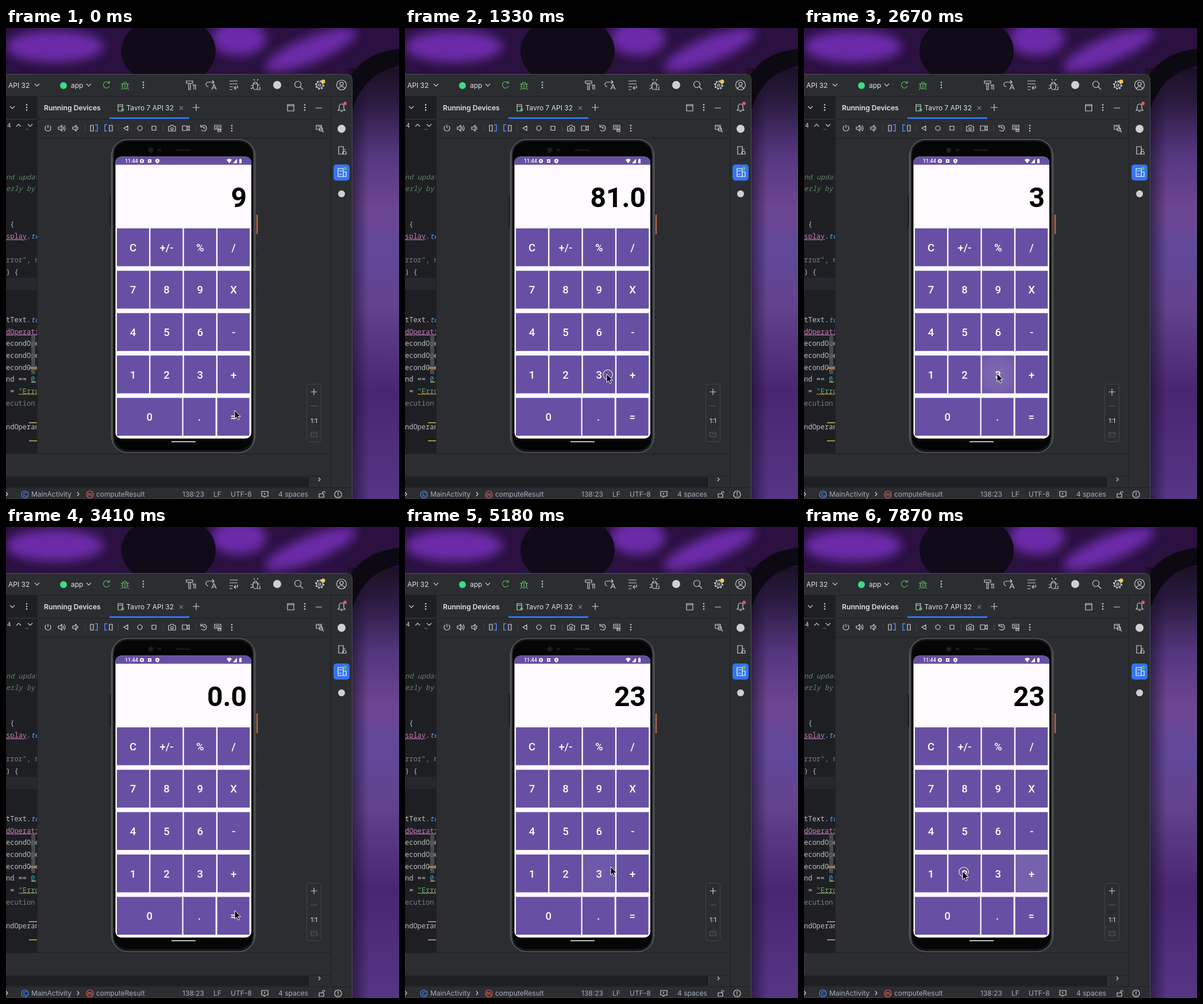
An HTML page that plays this animation: 684x818 px, repeating every 8 s.

```html
<!DOCTYPE html>
<html lang="en">
<head>
<meta charset="utf-8">
<title>Calculator in an emulator</title>
<style>
  html, body { margin: 0; width: 100%; height: 100%; overflow: hidden; background: #1c0f2b; }
  svg { display: block; }
  text { white-space: pre; }
  .ui { font: 12px Inter, sans-serif; fill: #dfe1e5; }
  .code { font: 12px "Noto Sans Mono", monospace; fill: #bcbec4; }
  .app { font: 500 18.5px Roboto, sans-serif; fill: #fff; text-anchor: middle; }
  .icons { fill: none; stroke: #ced0d6; stroke-width: 1.2; }
  .dots { fill: #ced0d6; stroke: none; }
  .pink { fill: #c77dbb; text-decoration: underline; }
  .blue { fill: #56a8f5; font-style: italic; }
  .doc { fill: #5f826b; font-style: italic; }
  .dim { fill: #7a7e85; }
</style>
</head>
<body>
<svg width="684" height="818" viewBox="0 0 684 818">
  <defs>
    <linearGradient id="side" x1="0" y1="0" x2="0" y2="1">
      <stop offset="0" stop-color="#1b1026"/><stop offset=".08" stop-color="#2c1b42"/>
      <stop offset=".2" stop-color="#54377e"/><stop offset=".32" stop-color="#6d4591"/>
      <stop offset=".43" stop-color="#60489a"/><stop offset=".55" stop-color="#63438d"/>
      <stop offset=".75" stop-color="#492672"/><stop offset="1" stop-color="#553584"/>
    </linearGradient>
    <linearGradient id="shade">
      <stop offset="0" stop-color="#140b20" stop-opacity=".55"/>
      <stop offset="1" stop-color="#140b20" stop-opacity="0"/>
    </linearGradient>
    <linearGradient id="bezel">
      <stop offset="0" stop-color="#55565a"/><stop offset=".025" stop-color="#161719"/>
      <stop offset=".975" stop-color="#161719"/><stop offset="1" stop-color="#4c4d51"/>
    </linearGradient>
    <radialGradient id="wave" gradientUnits="userSpaceOnUse">
      <stop offset="0" stop-color="#fff"/><stop offset=".6" stop-color="#fff" stop-opacity=".75"/>
      <stop offset="1" stop-color="#fff" stop-opacity=".3"/>
    </radialGradient>
    <filter id="soft" x="-50%" y="-50%" width="200%" height="200%"><feGaussianBlur stdDeviation="9"/></filter>
    <clipPath id="editor"><rect y="158" width="54" height="581"/></clipPath>
  </defs>

  <!-- Wallpaper -->
  <rect width="684" height="100" fill="#2a1140"/>
  <g filter="url(#soft)" fill="#6c2ba8">
    <ellipse cx="85" cy="32" rx="85" ry="28"/>
    <ellipse cx="405" cy="18" rx="48" ry="30"/>
    <ellipse cx="530" cy="38" rx="85" ry="22" transform="rotate(-22 530 38)"/>
  </g>
  <rect x="594" y="70" width="90" height="748" fill="url(#side)"/>
  <rect x="603" y="70" width="28" height="748" fill="url(#shade)"/>
  <path d="M600 84C618 52 650 40 684 36V66C650 74 618 90 600 150Z" fill="#0d0912"/>
  <ellipse cx="283" cy="40" rx="82" ry="62" fill="#110a18"/>

  <!-- Window panels -->
  <path d="M0 80.5H592Q602.5 80.5 602.5 91V818H0Z" fill="#2b2d30" stroke="#4b4d52"/>
  <path d="M0 118H54V739H0ZM0 780H528V797H0Z" fill="#1e1f22"/>
  <path d="M0 118.5H602M54 158.5H565M54 191.5H565M0 739.5H565M0 778.5H565M0 798.5H602M54.5 118V739M565.5 118V798" stroke="#1e1f22" fill="none"/>
  <path d="M0 158.5H54M528.5 779V798" stroke="#393b40"/>
  <path d="M180 156.500H319" stroke="#3574f0" stroke-width="3"/>

  <!-- Editor -->
  <g clip-path="url(#editor)">
    <rect y="434" width="54" height="21" fill="#26282e"/>
    <g class="code" id="code"></g>
    <rect x="44" y="533" width="7" height="68" fill="#55575b" opacity=".75"/>
    <path d="M40 590.500H54M40 685.500H54M40 717H54M44 615H52" stroke="#d6ae58" stroke-width="1.500"/>
    <path d="M22 637l2-2 2 2 2-2 2 2 2-2 2 2 2-2 2 2 2-2 2 2 2-2 2 2 2-2 2 2 2-2 2 2" fill="none" stroke="#d6ae58"/>
  </g>

  <!-- Labels -->
  <g class="ui">
    <text x="4" y="103.500">API 32</text>
    <text x="113" y="103.500">app</text>
    <text x="66" y="143" style="font-size:12.200px;font-weight:600">Running Devices</text>
    <text x="209.500" y="143">Tavro 7 API 32</text>
    <text x="2" y="173" style="font-size:10px">4</text>
    <text x="536" y="686" text-anchor="middle" style="font-size:11px">1:1</text>
    <g fill="#a8adbd">
      <text x="44" y="814">MainActivity</text><text x="157" y="814">computeResult</text>
      <text x="307" y="814">138:23</text><text x="361" y="814">LF</text>
      <text x="391" y="814">UTF-8</text><text x="474" y="814">4 spaces</text>
    </g>
  </g>

  <!-- Top toolbar -->
  <g class="icons">
    <path d="M50 97l4 4 4-4M140 97l4 4 4-4M7 136l4 4 4-4M18 171l4-4 4 4M38 167l4 4 4-4"/>
    <path d="M314 92h11v4h-11zM318 96v11h3v-11M324 99h6v8M327 99v8"/>
    <path d="M352 102a4 4 0 0 1 0-8h10m-3-3 3 3-3 3M358 107l4-9 4 9m-6.500-3h5"/>
    <path d="M389 92h14M389 97h14M389 102h6M389 107h5M403 100v4h-6m3-3-3 3 3 3"/>
    <path d="M430 97h8v6a4 4 0 0 1-8 0zM431 97a3 3 0 0 1 6 0M430 100h-4m4 3-4 3M438 99h4m-9-8 -2-2m6 2 2-2M437 107h5v-5"/>
    <circle cx="508" cy="98" r="5.500"/><path d="M512 102l5 5"/>
    <circle cx="546" cy="99" r="5.500"/><circle cx="546" cy="99" r="2"/>
    <circle cx="546" cy="99" r="7" stroke-dasharray="2.800 2.700" stroke-width="2"/>
    <circle cx="584" cy="99" r="8.500"/><circle cx="584" cy="97" r="3"/><path d="M578 105q6-7 12 0"/>
    <g stroke="#5fb865">
      <path d="M179 95a5.500 5.500 0 1 0 1 6M180 92v4h-4"/>
      <path d="M203 97h8v5a4 4 0 0 1-8 0zM204 97a3 3 0 0 1 6 0M203 99l-3-2m3 5h-3m3 3-3 2M211 99l3-2m-3 5h3m-3 3 3 2M207 98v7"/>
    </g>
  </g>
  <circle cx="100" cy="100" r="6" fill="#3ddc84"/>
  <circle cx="472" cy="99" r="7" fill="#ced0d6"/>
  <circle cx="584" cy="175" r="7" fill="#ced0d6"/>
  <circle cx="584" cy="288" r="6" fill="#ced0d6"/>
  <circle cx="552" cy="93" r="3.500" fill="#f2c55c"/>

  <!-- Tool window header and device controls -->
  <g class="icons">
    <path d="M302 136l6 6m0-6-6 6" stroke="#7a7e85"/>
    <path d="M195 133h8v11h-8zM196 136h6M201 143h4M325 138h12M331 132v12M539 139h11"/>
    <path d="M490 133h11v11h-11zM490 135h11"/>
    <path d="M70 170a5 5 0 1 0 6 0M73 168v6M91 172h3l3-3v10l-3-3h-3zM99 171q2 3 0 6M101 169q4 5 0 10M116 172h3l3-3v10l-3-3h-3zM124 171q2 3 0 6"/>
    <path d="M147 169h5v10h-5zM180 169h5v10h-5z"/>
    <path d="M155 168h4v11h-4M176 168h-4v11h4" stroke="#548af7" stroke-width="1.500"/>
    <path d="M212 170v8l-7-4zM254 170.500h7v7h-7zM283 171h3l1-2h4l1 2h3v8h-12zM307 170h8v8h-8zM315 173l4-3v8l-4-3M340 171a5 5 0 1 1 0 6M339 168v4h4M344 171v3h3"/>
    <circle cx="233" cy="174" r="4"/><circle cx="289" cy="175" r="2"/>
    <path d="M363 169h11v7h-11zM365 171.500h7M365 174h7M369 177h5v3h-5zM540 169h9v7h-9zM542 171h6"/>
    <circle cx="548" cy="176" r="3"/><path d="M550 178l3 3"/>
    <path d="M578 143h12l-2-3v-4a4 4 0 0 0-8 0v4zM582 145h4"/>
    <path d="M579 206h8v13h-8zM587 211h4M586 219v-2a3 3 0 0 1 6 0v2z"/>
  </g>
  <path d="M137.500 168V180M195.500 168V180M273.500 168V180M330.500 168V180" stroke="#43454a"/>
  <circle cx="590" cy="131" r="3" fill="#e55765"/>
  <rect x="570" y="237" width="28" height="28" rx="5" fill="#3574f0"/>
  <path d="M578 244h9v14h-9zM580 248h5M587 250h5v8h-7M580 254h4" class="icons" style="stroke:#fff"/>
  <circle cx="590" cy="244" r="3" fill="#5fb865"/><circle cx="203" cy="142" r="2.500" fill="#5fb865"/>
  <g class="dots" id="dots"></g>

  <!-- Zoom box and status bar -->
  <rect x="523.500" y="618.500" width="25" height="100" rx="4" fill="none" stroke="#43454a"/>
  <g class="icons">
    <path d="M530.500 632h11M536 626.500v11"/>
    <path d="M530 656.500h12M531 702h10v8h-10zM534 706l4-2" stroke="#55585e"/>
    <path d="M544 781l3 3-3 3M0 806l3 3.500-3 3.500M124 806l3 3.500-3 3.500M445 805h11v8h-4l-2 2-2-2h-3zM450 807v4M545 809h8v6h-8zM551 809v-2a2 2 0 0 1 4 0"/>
    <circle cx="578" cy="810" r="6"/><path d="M578 806v5m0 1v2"/>
    <circle cx="33" cy="810" r="6" stroke="#548af7"/><path d="M36 808a3 3 0 1 0 0 4" stroke="#548af7"/>
    <circle cx="146" cy="810" r="6" stroke="#db5c5c"/><path d="M143 813v-5m0 1q3-2 3 1v3m0-3q3-3 3 0v3" stroke="#db5c5c"/>
  </g>

  <!-- Phone -->
  <path d="M182 290V347" stroke="#18191b" stroke-width="3"/>
  <path d="M437 324V358" stroke="#b4664f" stroke-width="2.500"/>
  <path d="M436 394h2M436 459h2" stroke="#111"/>
  <rect x="183.500" y="193.500" width="250" height="544" rx="29" fill="url(#bezel)" stroke="#5b5c60" stroke-width="1.500"/>
  <rect x="187" y="197" width="243" height="536" rx="26" fill="#050506"/>
  <circle cx="252" cy="212" r="5" fill="#17181b"/><circle cx="252" cy="212" r="2" fill="#25272d"/>
  <path d="M296 212H322" stroke="#28292c" stroke-width="3" stroke-dasharray="1 1"/>
  <path d="M264 212h6" stroke="#17181b" stroke-width="4"/>
  <path d="M288 718.500H330" stroke="#fff" stroke-width="1.500"/>
  <rect x="190.500" y="223.500" width="236.500" height="489.500" rx="10" fill="#fffbfe"/>
  <path d="M190.500 237.500v-4a10 10 0 0 1 10-10h216.500a10 10 0 0 1 10 10v4z" fill="#6750a4"/>
  <text x="207" y="234" style="font:500 9px Roboto,sans-serif" fill="#fff">11:44</text>
  <circle cx="236.500" cy="231" r="2.500" fill="none" stroke="#fff" stroke-width="2.200"/>
  <path d="M247 228h6v6h-6zM260 228.500l3.500-1.500 3.500 1.500v3q-1 3-3.500 4-2.500-1-3.500-4zM384 229q5-4 9 0l-4.500 6zM395 235h7v-8zM406 228h1v-1h2v1h1v7h-4z" fill="#fff"/>
  <path d="M249 230h2v2h-2zM262.500 230h2v2h-2z" fill="#6750a4"/>
  <text id="display" x="419" y="310.500" text-anchor="end" style="font:700 48px Roboto,sans-serif"></text>
  <g id="keys"></g>
  <rect id="ripple" fill="url(#wave)"/>

  <!-- Pointer -->
  <g id="pointer">
    <g id="ring" fill="none">
      <circle cx="2" cy="1" r="8.700" stroke="#222" stroke-width="2.200" opacity=".55"/>
      <circle cx="2" cy="1" r="8.400" stroke="#fff" stroke-width="1.200"/>
    </g>
    <path d="M0 0V14.500L3.300 11.500L5.600 16.600L8 15.500L5.800 10.600H10.300Z" fill="#000" stroke="#fff"/>
  </g>
</svg>
<script>
const $ = id => document.getElementById(id);
const NS = 'http://www.w3.org/2000/svg';
function add(parent, tag, attrs, text = '') {
  const el = parent.appendChild(document.createElementNS(NS, tag));
  set(el, attrs);
  el.textContent = text;
  return el;
}
function set(el, attrs) {
  for (const name in attrs) el.setAttribute(name, attrs[name]);
}

// Overflow menus
for (const [x, y] of [[239, 99], [36, 138], [520, 138], [393, 174]])
  for (const d of [-4.5, 0, 4.5]) add($('dots'), 'circle', { cx: x, cy: y + d, r: 1.3 });

// Editor lines: row, then pairs of style and text
const lines = [
  [0, 'doc', 'nd updat'], [1, 'doc', 'erly by '], [4, '', ' {'],
  [5, 'pink', 'splay', '', '.', 'blue', 'te'], [7, 'dim', 'rror", m'], [8, '', ') {'],
  [12, '', 'tText.', 'blue', 'to'], [13, 'pink', 'dOperati'],
  [14, '', 'econdOpe'], [15, '', 'econdOpe'], [16, '', 'econdOpe'],
  [17, '', 'nd == ', 'num', '0:'], [18, '', ' = ', 'str', '"Erro'],
  [19, 'dim', 'ecution '], [21, '', 'ndOperan'],
];
for (const [row, ...parts] of lines) {
  const line = add($('code'), 'text', { x: 0, y: 262.5 + row * 20.7 });
  for (let i = 0; i < parts.length; i += 2) {
    const span = add(line, 'tspan', { class: parts[i] }, parts[i + 1]);
    if (parts[i] === 'num') span.style.fill = '#2aacb8';
    if (parts[i] === 'str') span.style.fill = '#6aab73';
  }
}
add($('code'), 'text', { x: 33, y: 181, class: 'dim' }, '~');

// Calculator keys; the zero key spans two columns
const keys = {};
['C +/- % /', '7 8 9 X', '4 5 6 -', '1 2 3 +', '0 . ='].forEach((row, r) => {
  const labels = row.split(' ');
  const wide = labels.length === 3;
  labels.forEach((label, c) => {
    const x = wide && c ? 249.8 + c * 58.9 : 193 + c * 58.4;
    const box = { x, y: 348 + r * 73.6, width: label === '0' ? 113.5 : 56, height: 65.7 };
    keys[label] = box;
    add($('keys'), 'rect', { ...box, fill: '#6750a4' });
    add($('keys'), 'text', { class: 'app', x: box.x + box.width / 2, y: box.y + 39.7 }, label);
  });
});

const LOOP = 8000, TICK = 148.3, LAST = 53;
const path = [
  [0, 398, 664], [4, 398, 664], [9, 351, 601], [11, 351, 601], [13, 400, 525], [14, 400, 525],
  [17, 336, 600], [18, 336, 600], [20, 398, 666], [24, 398, 666], [29, 280, 594], [32, 280, 594],
  [34, 358, 590], [35, 358, 590], [37, 406, 600], [40, 406, 600], [41, 407, 600],
  [50, 407, 600], [53, 276, 598],
];
const clicks = [9, 13, 17, 21, 29, 34, 49, 53];
const readout = [[0, '9'], [1, '81.0'], [10, '3'], [22, '0.0'], [30, '2'], [35, '23']];
// First tick, last tick, key, spread, opacity
const ripples = [
  [1, 1, '=', 45, .14], [10, 11, '3', 45, .12], [14, 15, '-', 45, .12], [18, 18, '3', 40, .15],
  [22, 22, '=', 45, .14], [31, 32, '2', 45, .1], [35, 35, '3', 45, .06],
  [50, 50, '+', 40, .1], [51, 53, '+', 300, .1],
];

function pointerAt(tick) {
  const i = Math.max(1, path.findIndex(p => p[0] >= tick));
  const [t0, x0, y0] = path[i - 1], [t1, x1, y1] = path[i];
  const k = (tick - t0) / (t1 - t0), ease = k * k * (3 - 2 * k);
  return [x0 + (x1 - x0) * ease, y0 + (y1 - y0) * ease];
}

function draw(now) {
  const tick = Math.min(LAST, Math.floor((now % LOOP + 12) / TICK));
  const [x, y] = pointerAt(tick);
  set($('pointer'), { transform: `translate(${x} ${y})` });
  set($('ring'), { visibility: clicks.includes(tick) ? 'visible' : 'hidden' });
  $('display').textContent = readout.filter(([start]) => start <= tick).pop()[1];

  const ripple = ripples.find(([from, to]) => from <= tick && tick <= to);
  set($('ripple'), { opacity: ripple ? ripple[4] : 0 });
  if (ripple) {
    const box = keys[ripple[2]];
    set($('ripple'), box);
    set($('wave'), { cx: box.x + box.width / 2, cy: box.y + box.height / 2, r: ripple[3] });
  }
  requestAnimationFrame(draw);
}
requestAnimationFrame(draw);
</script>
</body>
</html>
```
